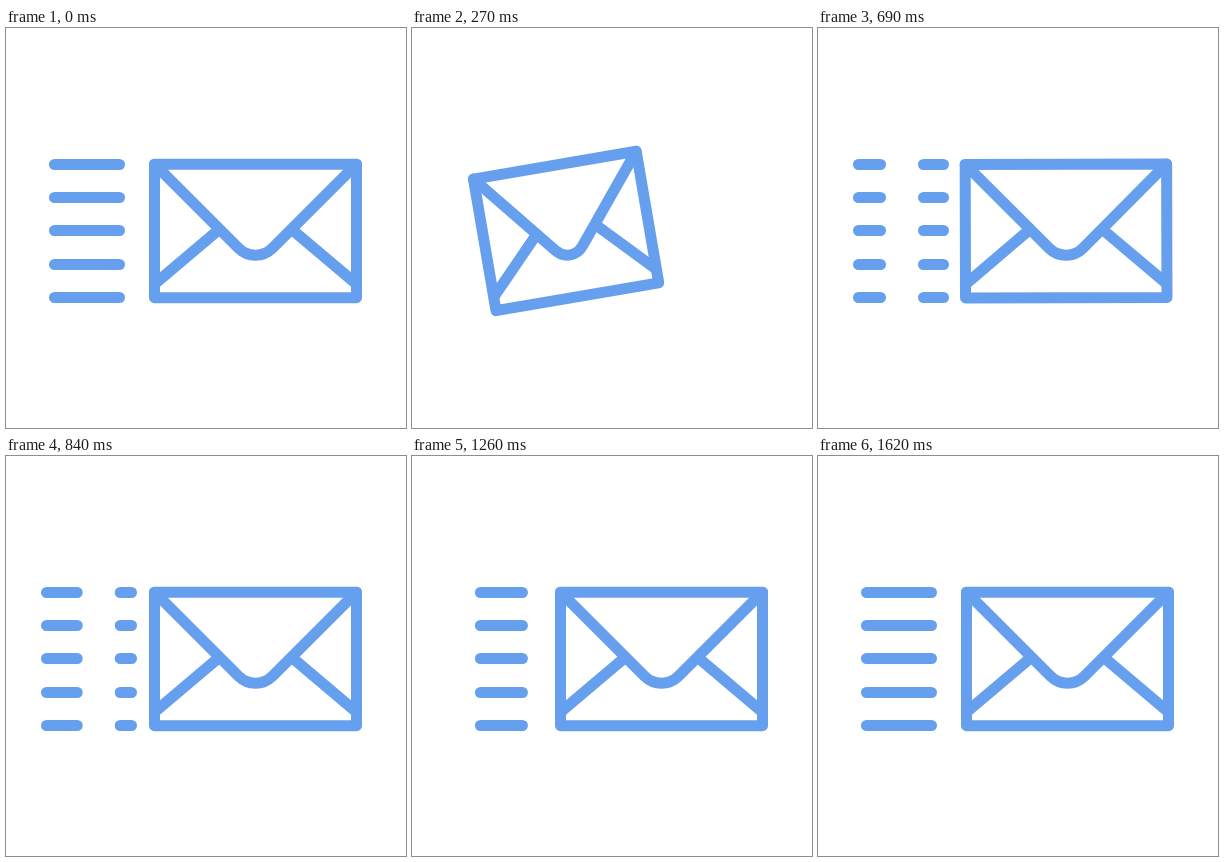
Recreate the animation shown at these times as an HTML page. Size 400 by 400 pixels, loop 1.65 s.

```html
<!DOCTYPE html>
<html lang="en">
<head>
<meta charset="utf-8">
<title>Sending mail</title>
<style>
  html, body { margin: 0; width: 100%; height: 100%; overflow: hidden; background: #fff; }
  svg { display: block; width: 400px; height: 400px; }
  path { fill: none; stroke: #659fee; stroke-width: 11; stroke-linecap: round; stroke-linejoin: round; }
  #envelope path { vector-effect: non-scaling-stroke; }
</style>
</head>
<body>
<svg viewBox="0 0 400 400">
  <g id="trails">
    <path d="M40.5 136.5h85"/>
    <path d="M40.5 169.5h85"/>
    <path d="M40.5 202.5h85"/>
    <path d="M40.5 236.5h85"/>
    <path d="M40.5 269.5h85"/>
  </g>
  <!-- drawn around its own centre -->
  <g id="envelope">
    <path d="M-101 -66.5H101V67H-101Z"/>
    <path d="M-101 -66.5L-17 17.5A24 24 0 0 0 17 17.5L101 -66.5"/>
    <path d="M-100 52.5L-38.5 .5M100 52.5L38.5 .5"/>
  </g>
</svg>
<script>
const LOOP = 1650, STEP = 30, TRACK = 85;
const envelope = document.getElementById('envelope');
const trails = document.getElementById('trails');

// smooth 0..1 ramp between two times
function ramp(t, from, to) {
  const u = Math.min(1, Math.max(0, (t - from) / (to - from)));
  return u * u * (3 - 2 * u);
}

function drawEnvelope(t) {
  const pull = ramp(t, 0, 300) - ramp(t, 300, 720);
  envelope.setAttribute('transform',
    `translate(${249.5 - 98.2 * pull} 202.7) rotate(${-10 * pull}) scale(${1 - 0.188 * pull} 1)`);
}

// each trail is one dash running left around its track, slowing to rest
function drawTrails(t) {
  const length = t < 300
    ? 65 * (1 - ramp(t, 0, 210))
    : 42 * ramp(t, 510, 660) + 23 * ramp(t, 1260, 1500);
  const rest = t < 300 ? 0 : Math.max(0, 1500 - t);
  const start = (8 + 0.000346 * rest * rest) % TRACK;
  trails.style.display = length > 0.5 ? '' : 'none';
  trails.setAttribute('stroke-dasharray', `${length} ${TRACK - length}`);
  trails.setAttribute('stroke-dashoffset', -start);
}

function frame() {
  const t = Math.floor(performance.now() % LOOP / STEP) * STEP;
  drawEnvelope(t);
  drawTrails(t);
  requestAnimationFrame(frame);
}
frame();
</script>
</body>
</html>
```
